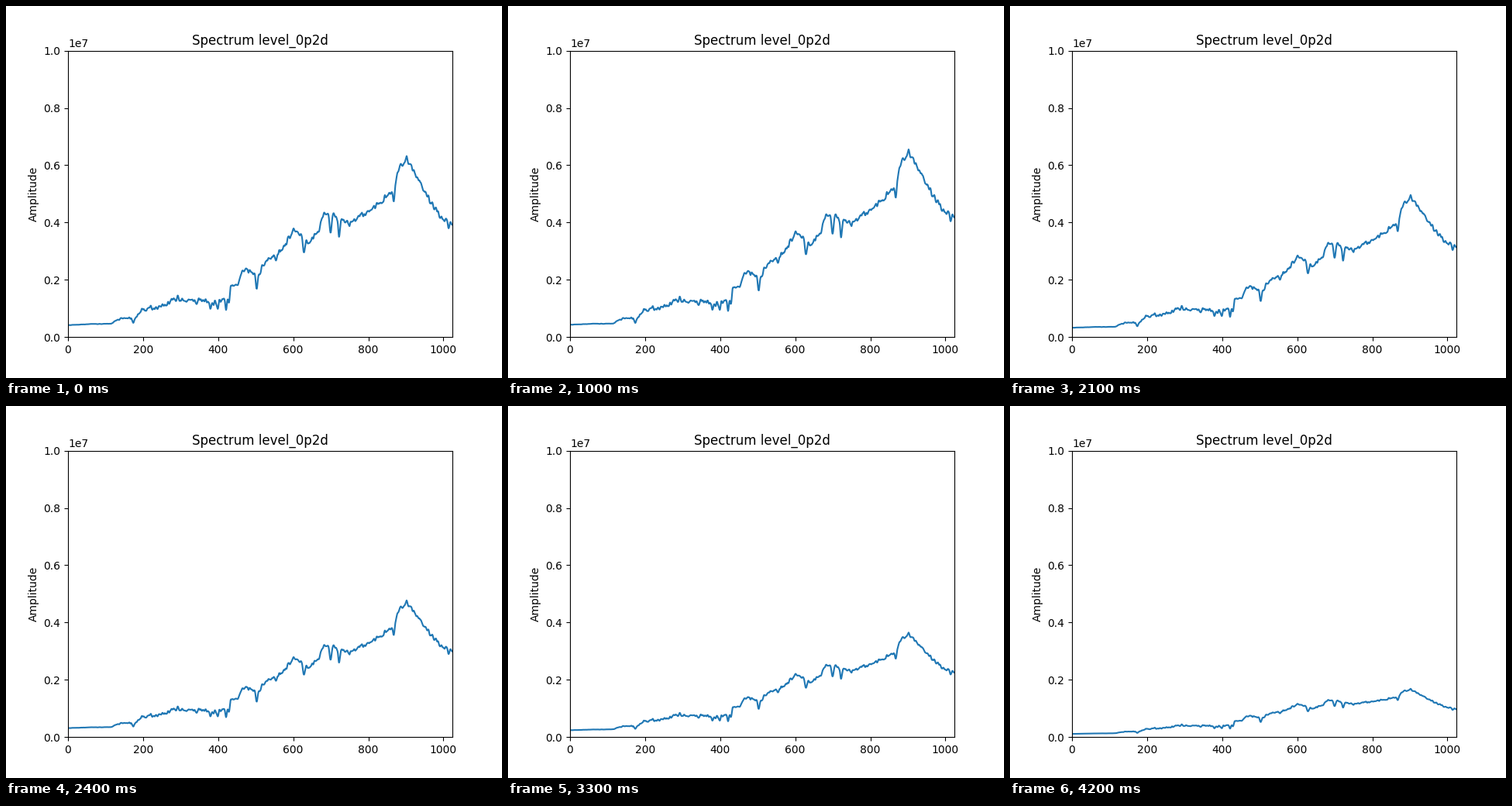
A matplotlib script that plays this animation: 640x480 px, repeating every 4.3 s.

```python
import numpy as np
import matplotlib.pyplot as plt
from matplotlib.animation import FuncAnimation

FRAMES, INTERVAL = 43, 100
SIZE = 1024

# Outline of the spectrum: (channel, amplitude / 1e6)
OUTLINE = np.array([
    (0, .42), (60, .46), (115, .47), (140, .66), (180, .68), (196, .96),
    (260, 1.07), (276, 1.31), (365, 1.31), (410, 1.28), (433, 1.84),
    (452, 1.95), (466, 2.33), (480, 2.34), (510, 2.2), (530, 2.75),
    (572, 3.08), (597, 3.7), (610, 3.74), (640, 3.35), (666, 3.68),
    (676, 4.25), (690, 4.35), (750, 4.02), (840, 4.8), (864, 5.2),
    (884, 6.07), (902, 6.3), (920, 5.88), (960, 4.9), (990, 4.28),
    (1023, 4.0),
])

# Channels with narrow drops
DEEP = (421, 429, 503, 628, 699, 722, 868)
SHALLOW = (174, 343, 380, 398, 554, 1013)

# Motion keys: (frame, peak amplitude / 1e6, gain of the middle band)
KEYS = np.array([
    (0, 6.32, 0), (6, 6.94, -.06), (10, 6.55, -.07), (12, 6.24, -.04),
    (18, 4.98, -.03), (21, 4.96, -.05), (28, 4.52, 0), (33, 3.65, .01),
    (36, 2.93, .05), (42, 1.69, .17),
])

# Plain letter spacing, without kerning
plt.rcParams["text.kerning_factor"] = 6

x = np.arange(SIZE)


def bell(offset, width):
    return np.exp(-.5 * (offset / width) ** 2)


def ripple():
    noise = np.random.default_rng(4).normal(size=SIZE)
    smooth = np.convolve(noise, bell(np.arange(-6, 7), 1.4), mode="same")
    strength = .05 * np.clip((x - 100) / 150, .06, 1)
    return strength * smooth / smooth.std()


def base_curve():
    y = np.interp(x, *OUTLINE.T) + ripple()
    for channels, depth in ((DEEP, .55), (SHALLOW, .22)):
        for channel in channels:
            y -= depth * bell(x - channel, 2.4)
    return y / y.max()


BASE = base_curve()
MIDDLE = np.sin(np.pi * x / 900)


def spectrum(frame):
    times, peaks, gains = KEYS.T
    peak = np.interp(frame, times, peaks) * 1e6
    gain = np.interp(frame, times, gains)
    return peak * BASE * (1 + gain * MIDDLE)


fig, ax = plt.subplots(figsize=(6.4, 4.8), dpi=100)
ax.set_title("Spectrum level_0p2d")
ax.set_ylabel("Amplitude")
ax.set_xlim(0, SIZE)
ax.set_ylim(0, 1e7)
line, = ax.plot(x, spectrum(0))


def update(frame):
    line.set_ydata(spectrum(frame))
    return line,


anim = FuncAnimation(fig, update, frames=FRAMES, interval=INTERVAL,
                     repeat=True, repeat_delay=0)
plt.show()
```
